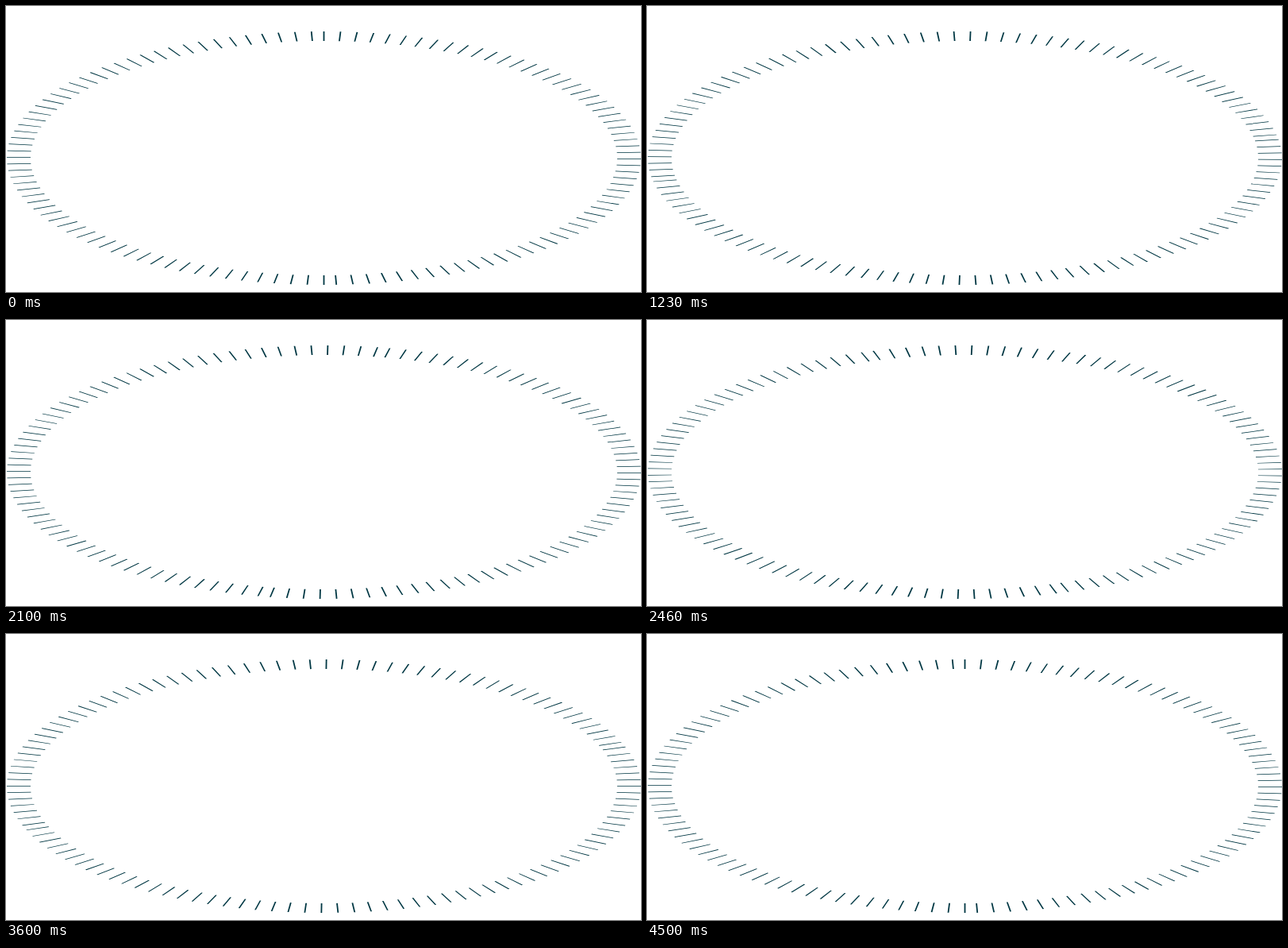
Animation of 800 by 360 pixels, one loop 4530 ms. Source, as an HTML page:

```html
<!DOCTYPE html>
<html lang="en">
<head>
<meta charset="utf-8">
<title>Rotating ticks</title>
<style>
  /* animating a registered angle redraws the lines sharply at every step */
  @property --turn {
    syntax: '<angle>';
    inherits: false;
    initial-value: 0deg;
  }
  html, body {
    margin: 0;
    width: 100%;
    height: 100%;
    overflow: hidden;
    background: #fff;
  }
  svg { display: block; }
  #ring {
    fill: none;
    stroke: #003743;
    stroke-width: 1.8;
    transform-origin: 0 0;
    transform: rotate(var(--turn));
    animation: turn 4530ms infinite;
  }
  /* 150 steps of 30 ms, then the start pose is held for one more step */
  @keyframes turn {
    0% { --turn: 0deg; animation-timing-function: steps(150, end); }
    99.3378%, 100% { --turn: -360deg; }
  }
</style>
</head>
<body>
<svg width="800" height="360" viewBox="0 0 800 360">
  <!-- the circle is flattened to an ellipse, strokes included -->
  <g transform="translate(400.5 191.5) scale(1 0.39925)">
    <path id="ring"/>
  </g>
</svg>
<script>
  const OUTER = 399.5, INNER = OUTER * 0.925;
  const PER_HALF = 60;
  const PITCH = Math.PI / 59.75; // leaves a narrower gap at the end of each half

  const point = (r, a) => `${(r * Math.sin(a)).toFixed(3)} ${(-r * Math.cos(a)).toFixed(3)}`;

  let d = '';
  for (const start of [0, Math.PI]) {
    for (let i = 0; i < PER_HALF; i++) {
      const a = start + i * PITCH;
      d += `M${point(INNER, a)}L${point(OUTER, a)}`;
    }
  }
  document.getElementById('ring').setAttribute('d', d);
</script>
</body>
</html>
```
